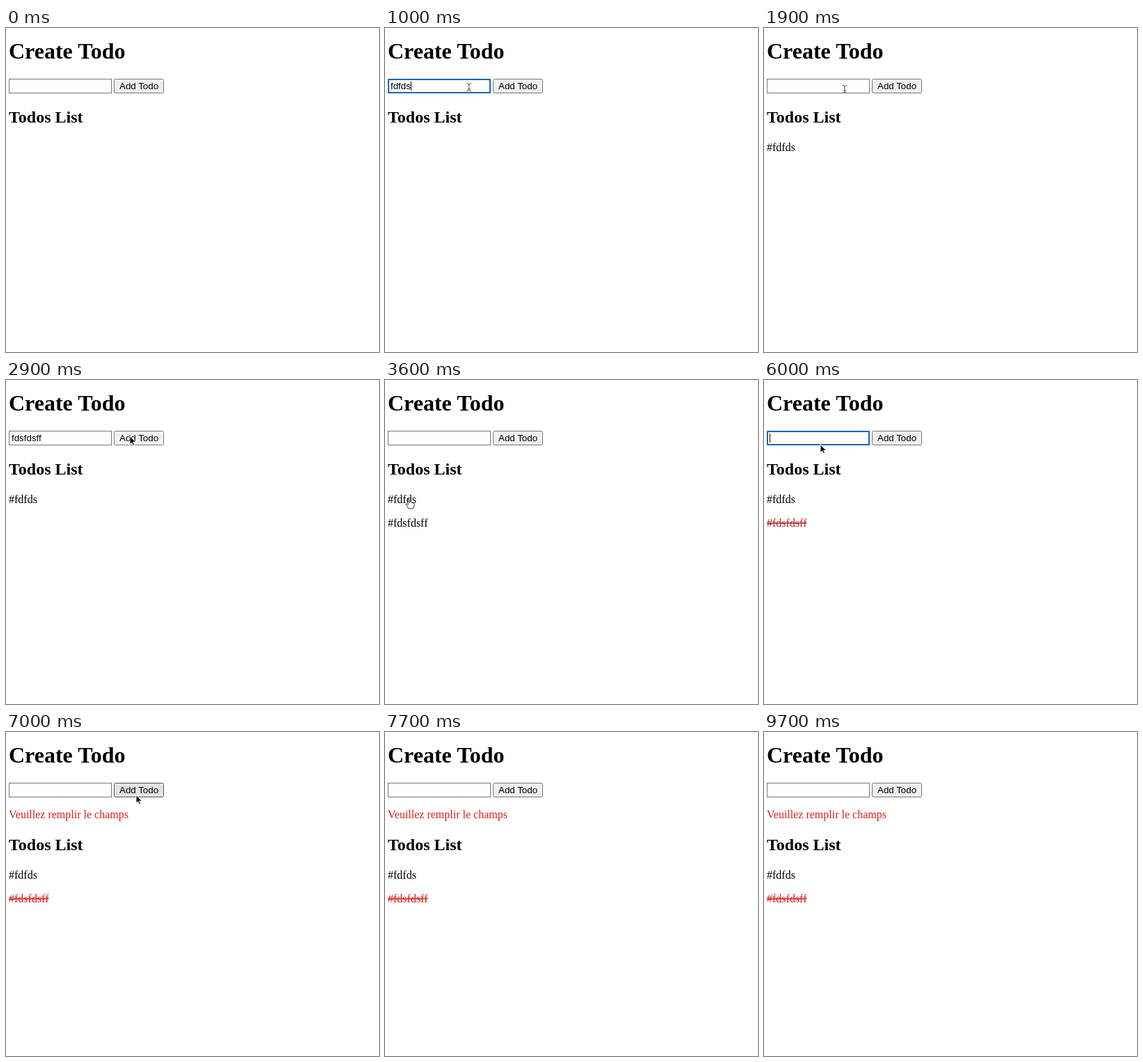
An HTML page for the animation above (10000 ms loop, 536 by 466 pixels).

```html
<!DOCTYPE html>
<html lang="en">
<head>
<meta charset="utf-8">
<title>Create Todo</title>
<style>
  html, body { margin: 0; width: 100%; height: 100%; overflow: hidden; background: #fff; }
  svg { display: block; font: 16px "Liberation Serif", Times, serif; }
  h1, .heading { font-weight: bold; }
  .ui { font: 13.333px "Liberation Sans", Arial, sans-serif; }
  .done { text-decoration: line-through; }
  #cursor path { stroke-linejoin: round; stroke-linecap: round; }
</style>
</head>
<body>
<svg width="536" height="466" viewBox="0 0 536 466">
  <text class="heading" x="4" y="44" font-size="32">Create Todo</text>

  <rect id="field" x="4.5" y="73.5" width="147" height="20" fill="#fff" stroke="#767676"/>
  <rect id="ring" x="5" y="74" width="146" height="19" rx="2" fill="none" stroke="#1268b8" stroke-width="2"/>
  <text id="typed" class="ui" x="8" y="88"></text>
  <path id="caret" d="M0 77v13" stroke="#000"/>

  <rect id="button" x="155.5" y="73.5" width="71" height="20" rx="2" stroke="#767676"/>
  <text class="ui" x="163" y="88">Add Todo</text>

  <text id="error" x="4" y="124" fill="#d8201f">Veuillez remplir le champs</text>
  <text id="list" class="heading" x="4" font-size="24">Todos List</text>
  <text id="first" x="4">#fdfds</text>
  <text id="second" x="4">#fdsfdsff</text>

  <g id="cursor">
    <path id="arrow" d="M0 0V11.5L2.7 9L4.6 13.2L6.5 12.3L4.7 8.3H8.3Z" stroke="#fff"/>
    <path id="beam" d="M-3 -5.5Q0 -5.5 0 -3.5Q0 -5.5 3 -5.5M0 -4V4M-3 5.5Q0 5.5 0 3.5Q0 5.5 3 5.5M-1.5 2H1.5" fill="none" stroke="#555"/>
    <path id="hand" d="M-3 1V-6Q-2 -8 -1 -6V-2Q1 -4 2 -1.5Q3.5 -3 4 -1Q6 -2 6 0V3L4.5 7H-2L-6 1Q-5 -1 -3 1Z" fill="#fff" stroke="#333"/>
  </g>
</svg>
<script>
const LOOP = 10000, STEP = 100;
const $ = id => document.getElementById(id);
const show = (id, on) => $(id).setAttribute("display", on ? "inline" : "none");
const set = (id, attrs) => {
  for (const name in attrs) $(id).setAttribute(name, attrs[name]);
};
const within = (t, from, to) => t >= from && t < to;

// Pointer stops: time, x, y
const stops = [
  [200, 95, 200], [400, 100, 86], [900, 100, 86], [1200, 180, 83], [1400, 180, 83],
  [1800, 116, 88], [2600, 116, 88], [2800, 178, 81], [3100, 178, 81], [3600, 36, 178],
  [4500, 36, 178], [4700, 36, 213], [5300, 36, 213], [5700, 78, 85], [5900, 78, 85],
  [6000, 81, 93], [6100, 81, 93], [6500, 187, 91], [7200, 187, 91]
];

// Typing spans: text, first key, last key, submit
const entries = [["fdfds", 500, 900, 1300], ["fdsfdsff", 2100, 2600, 3000]];

function pointerAt(t) {
  const i = stops.findIndex(stop => stop[0] > t);
  if (i < 1) return null;
  const [t0, x0, y0] = stops[i - 1], [t1, x1, y1] = stops[i];
  const p = (t - t0) / (t1 - t0), k = p * p * (3 - 2 * p);
  return { x: x0 + (x1 - x0) * k, y: y0 + (y1 - y0) * k };
}

function textAt(t) {
  const entry = entries.find(([, from, , submit]) => within(t, from, submit));
  if (!entry) return "";
  const [text, from, to] = entry;
  return text.slice(0, 1 + Math.floor((t - from) / (to - from) * (text.length - 1)));
}

function drawPointer(t, pos) {
  const typing = entries.some(([, from, to]) => within(t, from, to));
  show("cursor", pos && !typing);
  if (!pos) return;
  const { x, y } = pos;
  const overField = x > 4 && x < 152 && y > 73 && y < 92;
  const overItem = x < 62 && (within(y, 164, 184) || within(y, 198, 218));
  set("cursor", { transform: `translate(${x} ${y})` });
  show("beam", overField);
  show("hand", overItem);
  show("arrow", !overField && !overItem);
}

function draw(t) {
  const pos = pointerAt(t);
  drawPointer(t, pos);

  const focused = within(t, 400, 1300) || within(t, 2000, 2900) || within(t, 5700, 6600);
  $("typed").textContent = textAt(t);
  show("ring", focused);
  show("caret", focused);
  set("caret", { transform: `translate(${8.5 + $("typed").getComputedTextLength()} 0)` });

  const hover = pos && pos.x > 155 && within(pos.y, 73, 94);
  const strong = hover && t >= 6400;
  set("button", { fill: strong ? "#e3e3e3" : hover ? "#f3f3f3" : "#efefef", stroke: strong ? "#555" : "#767676" });

  const failed = t >= 6600, done = t >= 5000;
  const shift = failed ? 34 : 0;
  show("error", failed);
  show("first", t >= 1300);
  show("second", t >= 3000);
  set("list", { y: 136 + shift });
  set("first", { y: 176.5 + shift });
  set("second", {
    y: 210.5 + shift,
    class: done ? "done" : "",
    fill: failed ? "#d8201f" : done ? "#b02a2a" : "#000"
  });
}

function tick() {
  draw(Math.floor(performance.now() % LOOP / STEP) * STEP);
  requestAnimationFrame(tick);
}
tick();
</script>
</body>
</html>
```
